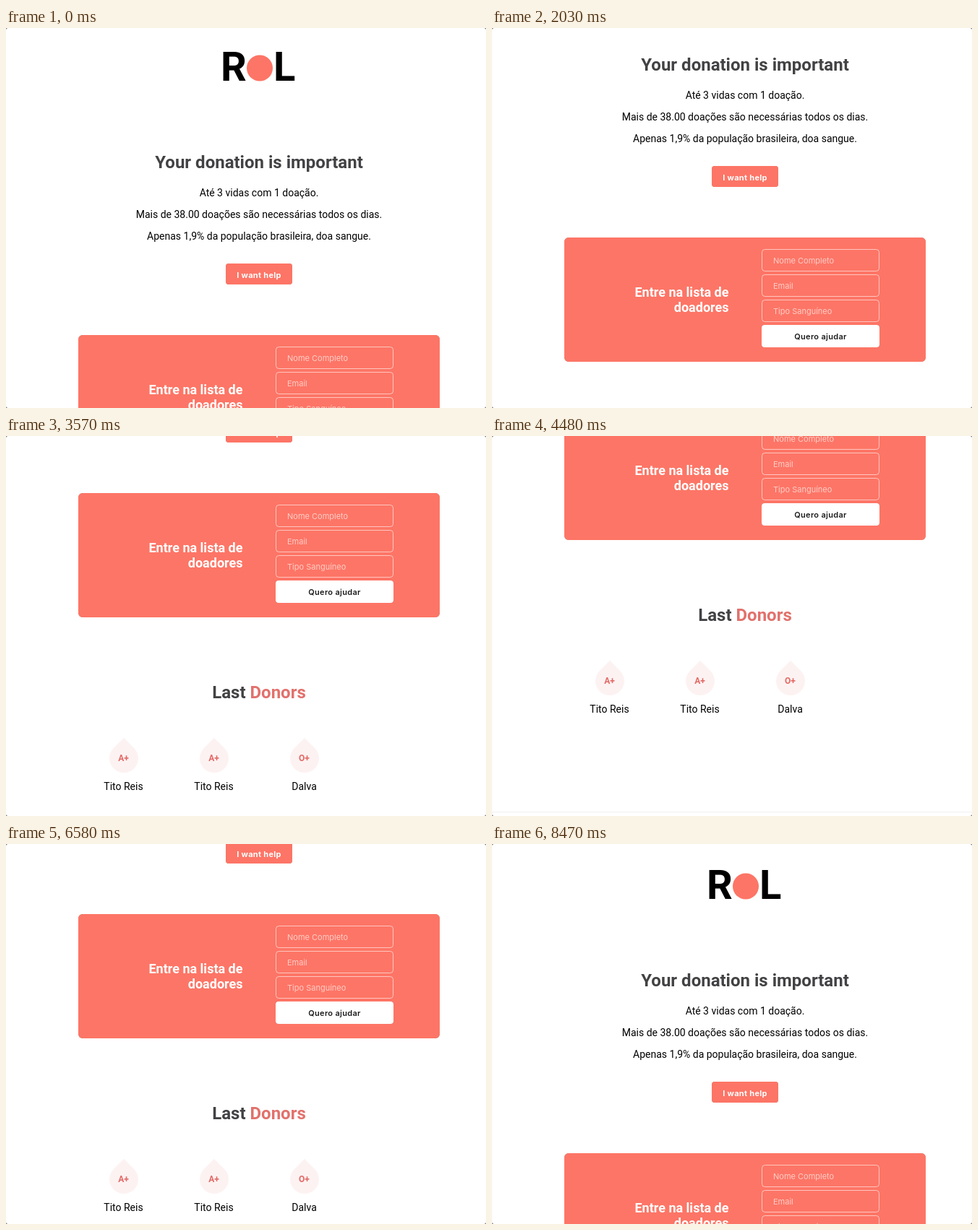
Recreate the animation shown at these times as an HTML page. Size 664x526 px, loop 9240 ms.

```html
<!DOCTYPE html>
<html lang="pt-BR">
<head>
<meta charset="utf-8">
<title>Blood donation page</title>
<style>
  html, body { margin: 0; width: 100%; height: 100%; overflow: hidden; background: #666; }
  svg { display: block; width: 664px; height: 526px; background: #fff; border-radius: 3px; }
  text { font-family: Roboto, Arial, sans-serif; font-size: 14px; }
  .mid { text-anchor: middle; }
  .end { text-anchor: end; }
  .logo { font-size: 56px; font-weight: 700; }
  .title { font-size: 24px; font-weight: 700; fill: #424244; }
  .accent { fill: #e2716c; }
  .lead { font-size: 18px; font-weight: 700; fill: #fff; }
  .coral { fill: #fd7566; }
  .raised { filter: drop-shadow(.3px .4px .7px rgba(0, 0, 0, .4)); }
  .field { fill: none; stroke: #fff; stroke-opacity: .58; }
  .hint, .btn { font-family: Inter, sans-serif; font-size: 11px; }
  .hint { fill: #fff; fill-opacity: .64; }
  .btn { font-weight: 600; fill: #1c1c1e; letter-spacing: .3px; }
  .help { font-weight: 700; fill: #fff; }
  .drop { fill: #fdf2f2; }
  .type { font-size: 12px; font-weight: 700; fill: #e26a66; }
</style>
</head>
<body>
<svg viewBox="0 0 664 526">
  <g id="page">
    <text class="logo" x="297" y="76">R</text>
    <circle class="coral" cx="351" cy="58.5" r="18"/>
    <text class="logo" x="370" y="76">L</text>

    <g class="mid" transform="translate(350)">
      <text class="title" y="197">Your donation is important</text>
      <text y="236">Até 3 vidas com 1 doação.</text>
      <text y="266">Mais de 38.00 doações são necessárias todos os dias.</text>
      <text y="296">Apenas 1,9% da população brasileira, doa sangue.</text>
      <rect class="coral raised" x="-46" y="329" width="92" height="29" rx="4"/>
      <text class="btn help" y="349">I want help</text>
      <rect class="coral raised" x="-250" y="428" width="500" height="172" rx="6"/>
      <text class="title" y="712">Last <tspan class="accent">Donors</tspan></text>
    </g>

    <text class="lead end" x="327.5" y="510">Entre na lista de</text>
    <text class="lead end" x="327.5" y="531">doadores</text>
    <g id="form" transform="translate(373 444)">
      <rect class="raised" y="105" width="163" height="31" rx="4" fill="#fff"/>
      <text class="btn mid" x="81.5" y="125">Quero ajudar</text>
    </g>

    <g id="donors" transform="translate(163 795)"></g>
    <rect y="976" width="664" height="1" fill="#f1f1f1"/>
  </g>
</svg>
<script>
  const LOOP = 9240, TICK = 70, REST = 3;
  const el = id => document.getElementById(id);

  const field = (label, i) => `<g transform="translate(0 ${35 * i})">
    <rect class="field" x=".5" y=".5" width="162" height="30" rx="4"/>
    <text class="hint" x="16" y="20">${label}</text></g>`;

  const donor = ([type, name], i) => `<g class="mid" transform="translate(${125 * i})">
    <path class="drop" d="M0-28 14.1-14.1A20 20 0 1 1-14.1-14.1Z"/>
    <text class="type" x="-.5" y="4">${type}</text>
    <text x="-.5" y="44">${name}</text></g>`;

  el('form').innerHTML += ['Nome Completo', 'Email', 'Tipo Sanguíneo'].map(field).join('');
  el('donors').innerHTML =
    [['A+', 'Tito Reis'], ['A+', 'Tito Reis'], ['O+', 'Dalva']].map(donor).join('');

  // Each swipe glides to a scroll position; the last one springs back from the top edge.
  const swipes = [
    { from: 1190, until: 2450, to: 174 },
    { from: 2700, until: 4340, to: 455 },
    { from: 4340, until: 5320, to: 464 },
    { from: 5460, until: 5810, to: 452 },
    { from: 6020, until: 6580, to: 331 },
    { from: 6650, until: 7700, to: -19 },
    { from: 7700, until: 8470, to: 0 }
  ];

  // Quick start, long momentum tail.
  const glide = u => 1 - (1 - u ** 1.5) ** 2;
  const clamp = u => Math.min(1, Math.max(0, u));

  const scrollAt = t => swipes.reduce(
    (y, { from, until, to }) => y + (to - y) * glide(clamp((t - from) / (until - from))),
    REST
  );

  const start = performance.now();
  function draw() {
    const t = (performance.now() - start) % LOOP;
    const y = Math.round(scrollAt(Math.floor(t / TICK) * TICK));
    el('page').setAttribute('transform', `translate(0 ${-y})`);
    requestAnimationFrame(draw);
  }
  draw();
</script>
</body>
</html>
```
